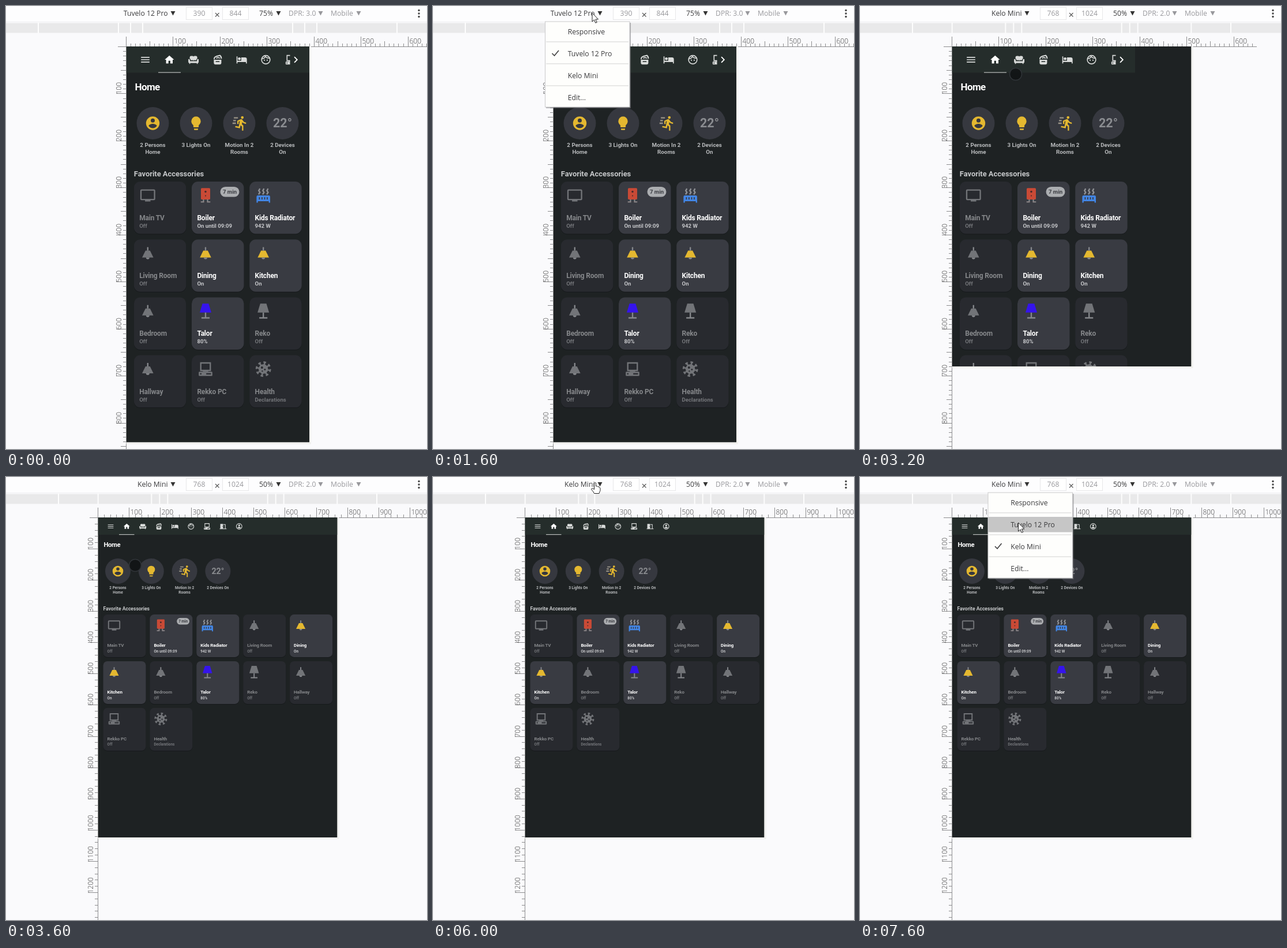
These frames come from a looping animation (730x767 px, 8000 ms). An HTML page:

```html
<!DOCTYPE html>
<html lang="en">
<head>
<meta charset="utf-8">
<title>Responsive dashboard</title>
<style>
  html, body { margin: 0; width: 100%; height: 100%; overflow: hidden; background: #fafafc; }
  svg { display: block; width: 730px; height: 767px; }
  .ui { font-family: "Open Sans", sans-serif; font-size: 12.2px; fill: #3a3a3c; }
  .app { font-family: Roboto, sans-serif; font-weight: 700; }
  .ruler { font-family: "Open Sans", sans-serif; font-weight: 300; font-size: 12px; fill: #444; }
</style>
</head>
<body>
<svg id="stage" viewBox="0 0 730 767" xmlns="http://www.w3.org/2000/svg"></svg>
<script>
const LOOP = 8000;
const PHONE = 'Tuvelo 12 Pro', TABLET = 'Kelo Mini';
const YELLOW = '#e4b830', DIM = '#727478';

const rect = (x, y, w, h, fill, extra = '') =>
  `<rect x="${x}" y="${y}" width="${w}" height="${h}" fill="${fill}" ${extra}/>`;
const text = (x, y, str, extra = '') => `<text x="${x}" y="${y}" ${extra}>${str}</text>`;
const path = (d, extra = '') => `<path d="${d}" ${extra}/>`;
const line = (d, width = 2) =>
  path(d, `fill="none" stroke="currentColor" stroke-width="${width}"`);
const dot = (x, y, r, extra = '') => `<circle cx="${x}" cy="${y}" r="${r}" ${extra}/>`;
const ring = (r, width = 2) => dot(12, 12, r, `fill="none" stroke="currentColor" stroke-width="${width}"`);

const lampShade = 'M7.5 .8H16.5L20.5 14H3.5Z';
const lampFoot = 'M11 14H13V20.8H18V22.8H6V20.8H11Z';
const spokes = [...Array(8).keys()].map(i =>
  `<g transform="rotate(${i * 45 + 12} 12 12)">${line('M12 7V2M10 1.8H14', 2.2)}</g>`).join('');

// All icons live in a 24 x 24 box
const ICONS = {
  menu: path('M3 6H21V8H3ZM3 11H21V13H3ZM3 16H21V18H3Z'),
  home: path('M10 20V14H14V20H19V12H22L12 3 2 12H5V20Z'),
  sofa: path('M4 10V7Q4 4 7 4H10Q12 4 12 6 12 4 14 4H17Q20 4 20 7V10Q18 10 18 13H6Q6 10 4 10Z') +
    path('M1 12Q1 10.5 2.5 10.5T4.5 12.5V15H19.5V12.5Q19.5 10.5 21.5 10.5T23 12.5V17Q23 19 21 19V21H19V19H5V21H3V19Q1 19 1 17Z') +
    line('M12 5V14', 1),
  pot: path('M4 12H20V19Q20 22 17 22H7Q4 22 4 19ZM8 15V17H16V15Z') +
    line('M5 11Q4 7 9 5L17 3Q20 5 20 10', 2.4) + line('M9 9Q13 6 17 9', 2),
  bed: path('M19 7H11V14H3V5H1V20H3V17H21V20H23V11A4 4 0 0 0 19 7Z') + dot(7, 10, 3),
  face: ring(9) + dot(9, 13, 1.4) + dot(15, 13, 1.4) + line('M4 10Q9 10 11 5 14 9 20 9'),
  pc: line('M5 3H19V14H5Z', 2) + path('M3 16H21Q22 16 22 17V21Q22 22 21 22H3Q2 22 2 21V17Q2 16 3 16ZM4 18V20H6V18ZM13 18V20H20V18Z') +
    path('M8 14H16V16H8Z'),
  door: path('M3 4H12V20H3ZM9 11V13H10.5V11Z') + line('M13 6H19V20M1 20H23'),
  user: ring(9) + dot(12, 9, 3) + path('M6 16Q12 11 18 16 12 21 6 16Z'),
  next: path('M8.6 16.6 13.2 12 8.6 7.4 10 6 16 12 10 18Z'),
  person: path('M12 19.2C9.5 19.2 7.3 17.9 6 16 6 14 10 12.9 12 12.9S18 14 18 16C16.7 17.9 14.5 19.2 12 19.2M12 5A3 3 0 0 1 12 11 3 3 0 0 1 12 5M12 2A10 10 0 0 0 12 22 10 10 0 0 0 12 2Z'),
  bulb: path('M12 2A7 7 0 0 0 5 9C5 11.4 6.2 13.5 8 14.7V17A1 1 0 0 0 9 18H15A1 1 0 0 0 16 17V14.7C17.8 13.5 19 11.4 19 9A7 7 0 0 0 12 2M9 20V21A1 1 0 0 0 10 22H14A1 1 0 0 0 15 21V20Z'),
  run: dot(16.5, 3.5, 2) +
    path('M12.9 19.4 13.9 15 16 17V23H18V15.5L15.9 13.5 16.5 10.5Q18.7 13 22 13V11Q19.2 11 17.7 8.6L16.7 7Q15.8 5.6 14.2 6.1L9 8.3V13H11V9.6L12.8 8.9 11.2 17 6.3 16 5.9 18Z') +
    `<g color="#9a9488">${line('M4 4H10M3 8H7M2 12H7')}</g>`,
  tv: path('M21 17H3V5H21M21 3H3A2 2 0 0 0 1 5V17A2 2 0 0 0 3 19H8V21H16V19H21A2 2 0 0 0 23 17V5A2 2 0 0 0 21 3Z'),
  boiler: `<g color="#8b8789">${line('M9 17V21.5H5M15 17V21.5H19', 1.8)}</g>` +
    rect(5.2, 1.2, 13.6, 16.8, '#c94a36', 'rx="1.5"') +
    dot(12, 6.5, 1.5, 'fill="#4b2a2a"') + dot(12, 12.5, .9, 'fill="#4b2a2a"'),
  radiator: `<g color="#8f9196">${[4.5, 10.5, 16.5].map(x => line(`M${x + 2.5} 2L${x + .8} 5 ${x + 2.5} 7.5 ${x + .5} 10.5`, 2)).join('')}</g>` +
    path('M2 22.5V14Q2 12 4 12H20Q22 12 22 14V22.5H20V20.5H4V22.5ZM5.5 14.5V18H7V14.5ZM9.3 14.5V18H10.8V14.5ZM13.2 14.5V18H14.7V14.5ZM17 14.5V18H18.5V14.5Z'),
  ceiling: path('M8.7 8H15.3L20.3 18.2H3.7Z') + `<g fill="#85878b">${path('M11 3H13V8H11ZM9.5 18.2A2.5 2.5 0 0 0 14.5 18.2Z')}</g>`,
  lamp: path(lampShade) + `<g fill="#85878b">${path(lampFoot)}</g>`,
  virus: spokes + path('M12 5A7 7 0 0 1 12 19 7 7 0 0 1 12 5M10 8A1.7 1.7 0 0 0 10 11.4 1.7 1.7 0 0 0 10 8M14.3 11.5A1.2 1.2 0 0 0 14.3 14 1.2 1.2 0 0 0 14.3 11.5M10.5 14A1 1 0 0 0 10.5 16 1 1 0 0 0 10.5 14Z')
};
const icon = (name, cx, cy, scale, color) =>
  `<g transform="translate(${cx} ${cy}) scale(${scale}) translate(-12 -12)" fill="${color}" color="${color}" fill-rule="evenodd">${ICONS[name]}</g>`;

const CARDS = [
  ['tv', 'Main TV', 'Off'], ['boiler', 'Boiler', 'On until 09:09', '#c94a36'],
  ['radiator', 'Kids Radiator', '942 W', '#4285e4'], ['ceiling', 'Living Room', 'Off'],
  ['ceiling', 'Dining', 'On', YELLOW], ['ceiling', 'Kitchen', 'On', YELLOW],
  ['ceiling', 'Bedroom', 'Off'], ['lamp', 'Talor', '80%', '#3514ec'],
  ['lamp', 'Reko', 'Off'], ['ceiling', 'Hallway', 'Off'],
  ['pc', 'Rekko PC', 'Off'], ['virus', 'Health', 'Declarations']
];

// Positions are relative to the top left corner of the device; k scales text
const phoneLayout = {
  k: 1, width: 317.5, header: 45.5, navX: 33, navGap: 41.8, navY: 23, nav: .815,
  names: ['menu', 'home', 'sofa', 'pot', 'bed', 'face'], tab: [55.5, 39],
  title: [15, 76], ringX: 46, ringGap: 75, ringY: 133, ringR: 28, ringIcon: 1.17, labelY: 174.3,
  devices: ['2 Devices', 'On'], section: [13.3, 225],
  cols: 3, x: 13.3, y: 234, size: 90.5, gap: 100.2, icon: 1.18, inset: 24, text: [9.4, 67, 80]
};
const tabletLayout = {
  k: .664, width: 415, header: 30, navX: 22, navGap: 27.85, navY: 15.5, nav: .54,
  names: ['menu', 'home', 'sofa', 'pot', 'bed', 'face', 'pc', 'door', 'user'], tab: [36.5, 26.5],
  title: [10, 51], ringX: 34.5, ringGap: 57.8, ringY: 93, ringR: 22, ringIcon: .93, labelY: 124,
  devices: ['2 Devices On'], section: [9, 161.3],
  cols: 5, x: 9, y: 168, size: 74, gap: 80.9, icon: .97, inset: 19, text: [7, 56, 65.6]
};

function card([name, title, state, color], i, L) {
  const x = L.x + (i % L.cols) * L.gap, y = L.y + Math.floor(i / L.cols) * L.gap;
  const [tx, ty, sy] = L.text, r = 11 * L.k;
  let out = rect(x, y + 1, L.size, L.size, '#16191b', `rx="${r}"`) +
    rect(x, y, L.size, L.size, color ? '#393b42' : '#282a2f', `rx="${r}"`) +
    icon(name, x + L.inset, y + L.inset, L.icon, color || DIM) +
    text(x + tx, y + ty, title, `font-size="${12 * L.k}" letter-spacing="${-.2 * L.k}" fill="${color ? '#fff' : '#85878a'}"`) +
    text(x + tx, y + sy, state, `font-size="${9.6 * L.k}" fill="${color ? '#c5c6c9' : '#74767a'}"`);
  if (name === 'boiler') {
    const w = 33 * L.k, h = 17.5 * L.k, bx = x + L.size - w - 8 * L.k, by = y + 9 * L.k;
    out += rect(bx, by, w, h, '#abadb0', `rx="${h / 2}"`) +
      text(bx + w / 2, by + h * .69, '7 min', `font-size="${9.6 * L.k}" fill="#393b40" text-anchor="middle"`);
  }
  return out;
}

function dashboard(L) {
  const labels = [['2 Persons', 'Home'], ['3 Lights On'], ['Motion In 2', 'Rooms'], L.devices];
  let out = rect(0, 0, L.width, L.header, '#252d2b') +
    rect(L.tab[0], L.header - 1, L.tab[1], 1.2, '#b9bcbb');
  L.names.forEach((name, i) => {
    out += icon(name, L.navX + i * L.navGap, L.navY, L.nav, name === 'home' ? '#fff' : '#d9dbda');
  });
  if (L === phoneLayout) {
    out += `<svg x="270" y="0" width="14" height="45">${icon('pc', 14.5, 23, .815, '#d9dbda')}</svg>` +
      icon('next', 294, 23, .9, '#fff');
  }
  out += text(...L.title, 'Home', `font-size="${17 * L.k}" letter-spacing="${-.6 * L.k}" fill="#fff"`);
  labels.forEach((rows, i) => {
    const x = L.ringX + i * L.ringGap;
    out += dot(x, L.ringY, L.ringR, 'fill="#36383f"');
    out += i < 3 ? icon(['person', 'bulb', 'run'][i], x, L.ringY, L.ringIcon, YELLOW)
      : text(x, L.ringY + 7.4 * L.k, '22°', `font-size="${21.5 * L.k}" fill="#8a8c90" text-anchor="middle"`);
    rows.forEach((row, j) => {
      out += text(x, L.labelY + j * 11.8 * L.k, row, `font-size="${9.8 * L.k}" fill="#b9bbbd" text-anchor="middle"`);
    });
  });
  return out + text(...L.section, 'Favorite Accessories', `font-size="${12.9 * L.k}" fill="#c6c8ca"`) +
    CARDS.map((c, i) => card(c, i, L)).join('');
}

function device(x, w, h, layout) {
  return rect(x, 70, w + 3, h + 3, '#f0f0ee') +
    `<svg class="app" x="${x}" y="70" width="${w}" height="${h}">${rect(0, 0, w, h, '#1e2223')}${dashboard(layout)}</svg>`;
}

function rulers(x0, unit, step, end = 730) {
  let marks = `M${x0 - 14} 70.5H${end}M${x0 + .5} 53V767`, labels = '';
  for (let u = step; u * unit < 700; u += step) {
    const size = u % 100 ? (u % 50 ? 5 : 9) : 17;
    const x = Math.round(x0 + u * unit) + .5, y = Math.round(70 + u * unit) + .5;
    if (x < end) marks += `M${x} 70v${-size}`;
    if (y < 767) marks += `M${x0} ${y}h${-size}`;
    if (u % 100) continue;
    if (x < end) labels += text(x + 2, 65, u);
    labels += text(0, 0, u, `transform="translate(${x0 - 8} ${y + 1}) rotate(-90)"`);
  }
  return path(marks, 'fill="none" stroke="#8c8c8e"') + `<g class="ruler">${labels}</g>`;
}

function toolbar(name, w, h, zoom, dpr, scale) {
  const arrow = (x, color) => path(`M${x} 9h8l-4 7.5z`, `fill="${color}"`);
  const box = (x, value) => rect(x + .5, 2.5, 45, 21, '#fff', 'stroke="#e7e7e9"') +
    text(x + 23, 17, value, 'text-anchor="middle" fill="#98989c"');
  let out = rect(0, 0, 730, 27, '#fdfdfe') + rect(0, 27, 730, 1, '#efeff1') + rect(0, 29.5, 730, 17, '#e9e9ea');
  for (const half of [130, 151, 172, 311, 414])
    for (const side of [-1, 1]) out += rect(366 + side * half * scale, 28, 2, 19, '#fdfdfd');
  out += text(280.5, 17, name, 'text-anchor="end"') + arrow(285.5, '#333') + box(312, w) +
    path('M363 12l6.5 6.5M369.5 12l-6.5 6.5', 'stroke="#555" stroke-width="1.1"') + box(375, h) +
    text(439, 17, zoom) + arrow(468.5, '#333') +
    text(490, 17, 'DPR: ' + dpr, 'fill="#98989c"') + arrow(541.5, '#98989c') +
    text(563, 17, 'Mobile', 'fill="#98989c"') + arrow(607.5, '#98989c');
  for (const y of [7.5, 13, 18.5]) out += dot(716, y, 1.7, 'fill="#444"');
  return `<g class="ui">${out}</g>`;
}

function menu(id, x, checked) {
  let out = rect(x + 2, 29, 147, 148, '#77777a', 'opacity=".55"') + rect(x + .5, 27, 146.5, 148, '#fefefc', 'stroke="#c9c9cb"') +
    rect(x + 1, 0, 146, 26.5, '#c6c6c6', `id="${id}Hover"`);
  ['Responsive', PHONE, TABLET, 'Edit...'].forEach((item, i) => {
    const y = 44 + i * 38;
    out += text(x + 39.7, y + 4.5, item);
    if (i) out += rect(x + 2, y - 20.5, 143, 1, '#d4d4d4');
    if (i === checked) out += path(`M${x + 12.5} ${y}l4 4 7.5-9`, 'fill="none" stroke="#444" stroke-width="1.7"');
  });
  return `<g id="${id}" class="ui">${out}</g>`;
}

const phoneBar = toolbar(PHONE, 390, 844, '75%', '3.0', 1);
const tabletBar = toolbar(TABLET, 768, 1024, '50%', '2.0', 2 / 3);
const scene = (id, body) => `<g id="${id}">${body}</g>`;
const stage = document.getElementById('stage');
const outline = 'fill="#fff" stroke="#222" stroke-width="1" stroke-linejoin="round"';

stage.innerHTML = rect(0, 0, 730, 767, '#fafafc') +
  scene('phone', phoneBar + rulers(208, .8145, 10) + device(208.5, 317.5, 685.5, phoneLayout)) +
  scene('resizing', tabletBar + rulers(159, .8145, 10, 688) + device(159.5, 415, 554, phoneLayout)) +
  scene('tablet', tabletBar + rulers(159, .5408, 20) + device(159.5, 415, 554, tabletLayout)) +
  menu('phoneMenu', 194, 1) + menu('tabletMenu', 221.5, 2) +
  scene('arrow', path('M0 0V15L3.5 11.8 5.8 17.3 8.2 16.3 5.9 11H10.5Z', outline)) +
  scene('hand', path('M-1.5 1Q0-.8 1.5 1V6.5Q4 5.5 4.5 7.3 7 6.5 7.3 8.6 9 8.5 9 10.5V14Q8 16 7 19H-1.5Q-3-.5 -6.5 12 -6.5 9.5 -3.5 10.5L-1.5 12Z'.replace('-3-.5', '-3 15.5'), outline)) +
  scene('touch', dot(0, 0, 10.5, 'fill="#111516" fill-opacity=".92" stroke="#303438" stroke-width="1.5"'));

// time, x, y, pointer shape
const POINTER = [
  [0, 0, 0, ''], [200, 597, 728, 'arrow'], [400, 558, 632, 'arrow'], [600, 475, 440, 'touch'],
  [800, 385, 240, 'touch'], [1000, 310, 95, 'touch'], [1200, 281, 11, 'hand'], [1400, 276, 12, 'arrow'],
  [2400, 277, 28, 'arrow'], [2600, 275, 62, 'arrow'], [2800, 272, 98, 'arrow'], [3000, 270, 118, 'arrow'],
  [3200, 270, 118, 'touch'], [3400, 262, 125, 'touch'], [3600, 224, 153, 'touch'], [3800, 142, 228, 'arrow'],
  [4000, 86, 297, 'arrow'], [4200, 68, 321, 'arrow'], [5000, 82, 300, 'arrow'], [5200, 128, 238, 'arrow'],
  [5400, 192, 155, 'touch'], [5600, 244, 82, 'touch'], [5800, 274, 30, 'arrow'], [6000, 281, 9.5, 'hand'],
  [6200, 279, 12, 'arrow'], [6400, 278, 18, 'arrow'], [6600, 278, 30, 'arrow'], [6800, 278, 45, 'arrow'],
  [7000, 278, 61, 'arrow'], [7200, 277, 72, 'arrow'], [7400, 271, 76, 'arrow'], [7600, 274.5, 79, 'arrow']
];
const get = id => document.getElementById(id);
const show = (id, on) => { get(id).style.display = on ? '' : 'none'; };

function draw(t) {
  const [, x, y, shape] = POINTER.filter(p => p[0] <= t).pop();
  show('phone', t < 3200);
  show('resizing', t >= 3200 && t < 3400);
  show('tablet', t >= 3400);
  show('phoneMenu', t >= 1400 && t < 3200);
  show('tabletMenu', t >= 6200);
  const item = Math.round((y - 44) / 38), center = 44 + item * 38;
  for (const id of ['phoneMenuHover', 'tabletMenuHover']) {
    show(id, item >= 0 && item < 4 && Math.abs(y - center) <= 13);
    get(id).setAttribute('y', center - 13);
  }
  for (const id of ['arrow', 'hand', 'touch']) {
    show(id, id === shape);
    get(id).setAttribute('transform', `translate(${x} ${y})`);
  }
}

const start = performance.now();
function tick() {
  draw((performance.now() - start) % LOOP);
  requestAnimationFrame(tick);
}
draw(0);
tick();
</script>
</body>
</html>
```
